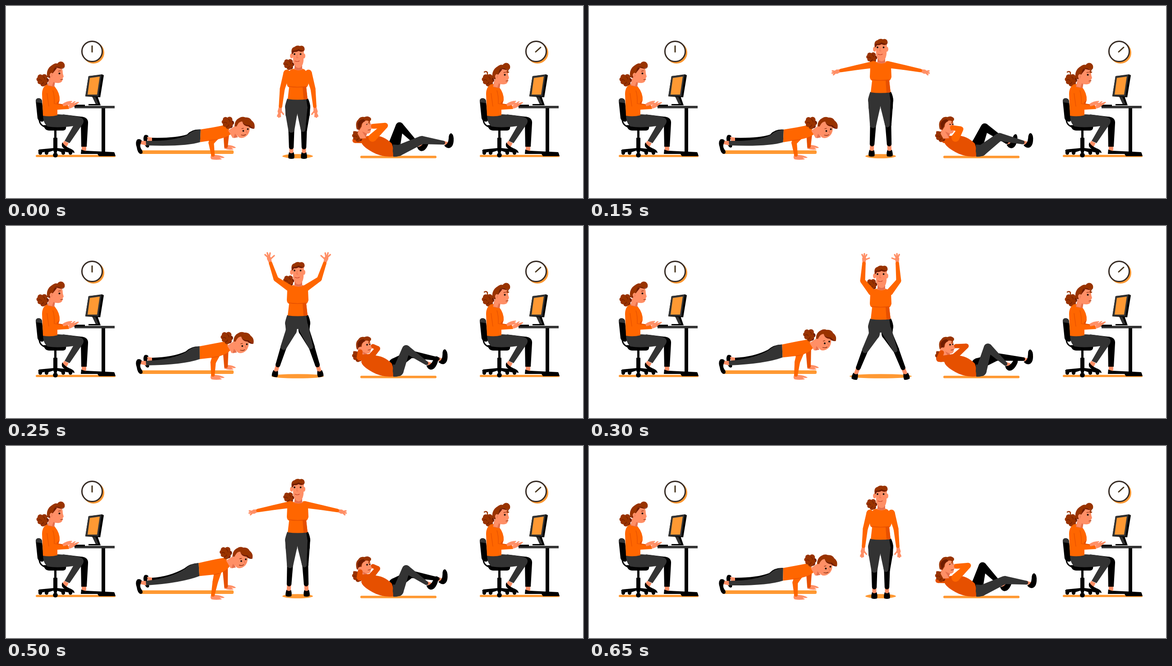
Write an HTML page that moves like this. It is 1280 px wide and 427 px high and loops after 700 ms.

```html
<!DOCTYPE html>
<html lang="en">
<head>
<meta charset="utf-8">
<title>Office workout</title>
<style>
html, body { margin: 0; width: 100%; height: 100%; overflow: hidden; background: #fff; }
svg { display: block; width: 100%; height: 100%; }
</style>
</head>
<body>
<svg id="stage" viewBox="0 0 1280 427"></svg>
<script>
const SHIRT = '#ff6600', SHADE = '#e65000', SKIN = '#ff8f66', BLUSH = '#e6704d';
const HAIR = '#993300', DARK = '#701c00', GREY = '#333', BLACK = '#000', AMBER = '#ff9933', EYE = '#201510';
const STEP = 50, STEPS = 14;

const path = (c, d) => `<path fill="${c}" d="${d}"/>`;
const line = (c, w, d) => `<path fill="none" stroke="${c}" stroke-width="${w}" stroke-linecap="round" stroke-linejoin="round" d="${d}"/>`;
const dot = (c, x, y, r) => `<circle fill="${c}" cx="${x}" cy="${y}" r="${r}"/>`;
const oval = (c, x, y, rx, ry) => `<ellipse fill="${c}" cx="${x}" cy="${y}" rx="${rx}" ry="${ry}"/>`;
const box = (c, x, y, w, h, r = 0) => `<rect fill="${c}" x="${x}" y="${y}" width="${w}" height="${h}" rx="${r}"/>`;
const group = (transform, s) => `<g transform="${transform}">${s}</g>`;
const mix = (a, b, u) => a.map((v, i) => v + (b[i] - v) * u);

// Tapered limb through joints [x, y, radius]
function limb(c, ...joints) {
  return joints.map(([x, y, r], i) => {
    let s = dot(c, x, y, r);
    if (joints[i + 1]) {
      const [X, Y, R] = joints[i + 1], len = Math.hypot(X - x, Y - y) || 1;
      const nx = (y - Y) / len, ny = (X - x) / len;
      s += path(c, `M${x + nx * r} ${y + ny * r}L${X + nx * R} ${Y + ny * R}L${X - nx * R} ${Y - ny * R}L${x - nx * r} ${y - ny * r}Z`);
    }
    return s;
  }).join('');
}

// Curly bun, about 27 px wide, centred on x, y
const bun = (x, y, k = 1) => group(`translate(${x} ${y}) scale(${k})`,
  dot(DARK, 9, 0, 5) + dot(DARK, 6, 7, 5) +
  [[-5, -7, 6], [4, -7, 6.5], [-9, -2, 4.5], [-6, 4, 5], [1, 8, 6], [6, 3, 5.5], [0, 0, 8]]
    .map(([a, b, r]) => dot(HAIR, a, b, r)).join('') +
  line(DARK, 1.2, 'M-9 0Q-5 -3 -2 1M1 -8Q5 -6 5 -2M-3 9Q1 8 2 4'));

function deskHead(messy) {
  const curls = messy ? line(HAIR, 2.4, 'M118 132Q129 135 125 141Q121 146 127 144M82 153Q79 150 80 145Q77 141 73 144') : '';
  return path(BLUSH, 'M96 160L109 168L107 180L92 177Z') +
    path(SKIN, 'M97 157L97 143L108 134L122 134Q126 141 126 150L128 157L126 160Q126 170 118 171Q111 172 105 169L102 178L93 176Z') +
    path(DARK, 'M91 158Q91 141 104 134L113 138L105 148L97 160Z') +
    path(HAIR, 'M91 156Q89 139 103 131Q109 126 114 128Q118 122 125 124Q132 128 130 136Q124 140 117 136Q109 134 106 141Q106 149 98 151L95 160Z') +
    path(DARK, 'M108 136Q115 133 122 138Q127 139 130 135Q128 141 120 139Z') +
    oval(SKIN, 101, 154, 4, 5.5) + line(BLUSH, 1, 'M101 151Q104 153 101 157') +
    dot(EYE, 118.5, 150, 2.1) + line(DARK, 1, 'M116 145L121 144M121 164L126 163') + curls;
}

function desk(x, messy) {
  const s = box(AMBER, 66, 331, 177, 5, 2.5) +
    // clock
    dot(AMBER, 194, 104, 24) + `<circle cx="191" cy="101" r="22.6" fill="#fff" stroke="#362b24" stroke-width="3"/>` +
    line('#46351d', 3, messy ? 'M190 102L201 92' : 'M191 89V102') +
    // chair
    path(BLACK, 'M66 211Q66 205 73 205Q80 206 80 213L84 253Q84 258 78 257Q72 256 70 250Z') +
    path(GREY, 'M66 214Q65 205 73 205Q80 206 80 216Z') +
    line(BLACK, 3, 'M74 254Q75 266 90 270') +
    path(BLACK, 'M83 265H133Q135 276 127 277H95Q86 277 83 265Z') +
    box(BLACK, 107, 276, 5, 20) + box(BLACK, 105, 293, 9, 25, 1) +
    path(BLACK, 'M105 316L74 319Q70 321 72 324L105 321L107 328H112L114 321L144 324Q148 321 144 319L114 316Z') +
    [76, 90, 127, 143].map(a => dot(BLACK, a, 326.5, 4.2) + line(BLACK, 2.5, `M${a} 325L109 319`)).join('') + dot(BLACK, 109.5, 331.5, 5.3) +
    // table and screen
    box(BLACK, 212, 225, 8, 101) + path(BLACK, 'M178 322L240 325Q242 329 243 334H206L203 329H178Z') +
    box(GREY, 152, 222, 89, 5.5) + box(BLACK, 146, 219.5, 29, 4) +
    path(BLACK, 'M191 201H203L210 221H183V218H199Z') + path(GREY, 'M191 201H198L205 218H199Z') +
    path(BLACK, 'M183 156L213 152L217 154L209 203L176 201Z') + path(GREY, 'M183 156L212 153L205 201L176 200Z') +
    path(AMBER, 'M186 160L208 157L202 197L181 197Z') +
    // far leg
    path(BLACK, 'M125 241L166 246Q183 247 182 261L179 313H167L166 260Z') +
    box(SKIN, 168, 313, 10, 9) + path(BLACK, 'M167 319Q174 323 186 323V329H166Z') +
    // near leg
    path(SKIN, 'M129 300L139 305L134 314L125 307Z') +
    path(BLACK, 'M125 303Q129 311 140 316Q152 320 152 327Q141 324 130 318Q121 313 125 303Z') +
    path(GREY, 'M82 242Q116 238 159 246Q176 249 171 261L141 305L130 300L149 267Q114 272 92 268Q82 260 82 242Z') +
    // body
    bun(messy ? 84 : 81, 165) +
    path(SHIRT, 'M91 174Q80 180 80 196L82 244Q98 247 114 243V226L119 209Q120 194 108 179Q99 172 91 174Z') +
    path(SHADE, 'M119 209L116 217L137 220V225L112 225L113 214Z') +
    group(messy ? 'translate(3 3)' : '', deskHead(messy)) +
    path(SHIRT, 'M90 190L104 189L107 217L138 222L140 229L108 231Q96 232 95 223Z') +
    line(SHADE, 1.2, 'M104 188Q108 201 107 217L137 222M91 194L95 223');
  return group(`translate(${x} 0)`, s);
}

function typing(x, i) {
  const near = [0, 2, -2, 1, 3, -1, 0][i % 7], far = -near;
  return group(`translate(${x} 0)`,
    group(`rotate(${far} 126 221)`, path(SKIN, 'M125 218Q134 211 146 211Q149 213 143 214L147 216L144 219L127 223Z')) +
    group(`rotate(${near} 138 226)`, path(SKIN, 'M138 222L145 217L151 212L155 212L150 217L160 213Q164 214 159 217L151 223Q147 227 140 228Z') +
      line(BLUSH, .8, 'M149 219L158 215')));
}

function pushup(low) {
  const xy = (a, b, c, d) => mix([a, b], [c, d], low);
  const hip = xy(427, 259, 433, 278), seat = xy(429, 288, 431, 306);
  const shoe = 'M291 297Q297 294 301 299L298 309Q297 315 302 321Q305 328 299 329Q292 328 290 314Q286 303 291 297Z';
  const head = bun(487, 236) +
    path(SKIN, 'M488 253L503 243L509 264L498 270Z') + path(BLUSH, 'M503 260L510 268L500 270Z') +
    path(SKIN, 'M503 243Q506 227 522 229L535 240Q538 254 531 263Q522 272 513 269Q503 263 503 243Z') +
    path(HAIR, 'M502 244Q502 230 513 225Q519 221 526 224Q536 223 540 231Q549 237 546 249Q538 249 534 242Q523 242 519 233Q511 233 507 244Z') +
    path(DARK, 'M519 233Q523 242 535 241Q540 247 546 249Q538 250 533 244Q522 244 519 233Z') +
    oval(SKIN, 511, 245, 4, 5.5) + dot(EYE, 521.5, 254, 2) + dot(EYE, 531.5, 250, 2) +
    line(BLUSH, 1.3, 'M528 253L530 259') + line(DARK, 1.1, 'M517 263Q523 265 527 262M518 249L522 248');
  return box(AMBER, 296, 321, 209, 8, 3) +
    group('translate(57 32) scale(.86)', path(BLACK, shoe)) +
    path(SKIN, 'M313 291L326 293V300H315Z') + path(SKIN, 'M299 300L312 300L311 310L298 307Z') + path(BLACK, shoe) +
    path(BLACK, `M324 293Q${xy(362, 290, 378, 295)} ${xy(395, 271, 403, 289)}Q${xy(408, 260, 413, 276)} ${hip}L${xy(398, 285, 400, 300)}L324 301Z`) +
    path(GREY, `M310 300Q${xy(365, 293, 374, 303)} ${xy(397, 272, 404, 290)}Q${xy(409, 260, 416, 279)} ${hip}L${seat}Q${xy(388, 304, 400, 315)} 311 310Z`) +
    path(SKIN, 'M484 310L492 309Q505 310 510 315Q508 317 500 315L505 319Q493 321 484 317Z') +
    limb(SHADE, [...xy(486, 270, 489, 293), 6], [488, 312, 4]) +
    path(SKIN, 'M455 331L464 331Q478 332 485 337Q482 339 474 337L479 341Q466 343 456 341Q452 338 455 331Z') +
    path(SHIRT, `M${hip}Q${xy(460, 251, 462, 274)} ${xy(487, 247, 489, 268)}L${xy(496, 266, 501, 288)}Q${xy(485, 281, 489, 297)} ${xy(462, 285, 455, 302)}L${seat}Z`) +
    limb(SHIRT, [...xy(471, 277, 463, 294), 8], [...xy(465, 302, 453, 304), 6], [459, 331, 4]) +
    line(SHADE, 1.2, `M${xy(462, 285, 448, 302)}L${xy(474, 282, 468, 300)}`) +
    group(`translate(${6 * low} ${29 * low})`, head);
}

// lift, shoulder, elbow, wrist, fingertip, foot offset, foot y, shadow radius, finger spread, thumb angle
const JACK = [
  [0, 623, 149, 613, 184, 609, 223, 605, 249, 14, 332, 34, .1, -.5],
  [-13, 633, 135, 597, 154, 562, 173, 544, 192, 14, 332, 34, .1, -.5],
  [-17, 631, 125, 594, 119, 556, 114, 532, 107, 26, 322, 34, .25, .5],
  [-8, 630, 139, 599, 118, 587, 83, 579, 58, 50, 328, 58, .2, .75],
  [0, 627, 147, 607, 122, 610, 83, 611, 60, 57, 334, 69, .2, .75]
];

function hand(x, y, tx, ty, spread, thumb) {
  const a = Math.atan2(ty - y, tx - x), len = Math.hypot(tx - x, ty - y);
  const at = (t, k) => [x + Math.cos(t) * len * k, y + Math.sin(t) * len * k];
  const mid = at(a, .45);
  return limb(SKIN, [x, y, 3.2], [...mid, 4.6]) +
    [-1, 0, 1].map(k => line(SKIN, 3.4, `M${mid}L${at(a + k * spread * 1.3, .93 - .06 * Math.abs(k))}`)).join('') +
    line(SKIN, 3.2, `M${at(a, .3)}L${at(a + thumb, .72)}`);
}

function jack(pose) {
  const [lift, sx, sy, ex, ey, wx, wy, tx, ty, foot, fy, shadow, spread, thumb] =
    mix(JACK[Math.floor(pose)], JACK[Math.ceil(pose)], pose % 1);
  const hip = [633, 224 + lift], sole = [647 - foot, fy], open = Math.max(0, foot - 14) / 43;
  const knee = mix(sole, hip, .53), ankle = mix(sole, hip, .17);
  const flip = s => group('translate(1294 0) scale(-1 1)', s);
  const lower = limb(SKIN, [...ankle, 4.5], [...mix(sole, hip, .04), 4.5]) +
    group(`translate(${sole}) rotate(${open * 12})`, path(BLACK, 'M-5 -7Q0 -2 5 -7Q8 2 6 7Q0 9 -6 7Q-8 3 -5 -7Z')) +
    limb(BLACK, [...knee, 6.6], [...ankle, 5.2]);
  const thigh = c => limb(c, [...hip, 13.8], [hip[0], hip[1] + 16, 13 - open], [...knee, 7]);
  const arms = hand(wx, wy, tx, ty, spread, thumb) +
    limb(SHIRT, [sx, sy, 7.5], [ex, ey, 5.5], [wx, wy, 3.8]);
  const rightKnee = [1294 - knee[0] - 2, knee[1]];
  const head = path(BLUSH, 'M640 126H657V140Q649 145 640 140Z') +
    path(SKIN, 'M636 97Q649 92 661 98L660 122Q658 137 649 138Q641 137 637 125Z') +
    oval(SKIN, 633.5, 111, 3.5, 5.5) + oval(SKIN, 661, 111, 3, 5.5) +
    path(HAIR, 'M634 107Q631 93 640 91Q645 86 652 89Q658 87 661 91Q664 96 661 100Q656 102 649 98Q643 101 639 100L636 107Z') +
    path(DARK, 'M635 99Q643 100 649 96Q655 100 661 99Q657 104 649 100Q644 103 639 102L635 107Z') +
    dot(EYE, 640, 107, 2) + dot(EYE, 653.5, 107, 2) +
    line(BLUSH, 1.1, 'M646 108L645 115H648') + line('#c23c22', 1.1, 'M641 122Q646 125 651 122');
  return oval(AMBER, 647, 334, shadow, 4.8) + lower + flip(lower) +
    flip(thigh(BLACK)) + thigh(GREY) + limb(GREY, [656, hip[1], 13], [...rightKnee, 5.2]) +
    group(`translate(0 ${lift})`,
      path(BLACK, 'M664 206H670Q675 216 674.8 225L662 226Z') +
      path(GREY, 'M624 206H666L669 226L661 234Q647 240 632 235L619.2 224Q620 216 624 206Z') + bun(627, 130, .88)) +
    arms + flip(arms) +
    group(`translate(0 ${lift})`,
      path(SHIRT, 'M632 141Q640 138 647 140Q656 138 662 141L670 150L671 173Q669 180 666 181L669 207Q647 210 625 207L628 181Q623 179 623 172L624 150Z') +
      path(SHADE, 'M658 180H666L669 207L660 208Z') + line(SHADE, 1.3, 'M628 179Q647 182 666 179') +
      path(SKIN, 'M637 140Q649 136 660 140Q649 146 637 140Z') + head);
}

// near knee, near ankle, near shoe turn, far knee, far ankle, far shoe turn, near elbow, near hand, far elbow
const SITUP = [
  [884, 269, 925, 307, 32, 906, 293, 968, 296, -2, 774, 297, 784, 276, 841, 265],
  [893, 281, 954, 302, 2, 885, 273, 950, 295, -4, 799, 286, 790, 271, 800, 284],
  [922, 298, 974, 304, 0, 873, 267, 916, 308, 22, 841, 266, 804, 268, 774, 299]
];

function situp(u) {
  const [kx, ky, ax, ay, turn, fkx, fky, fax, fay, farTurn, ex, ey, hx, hy, fx, fyy] =
    mix(SITUP[1], SITUP[u < 0 ? 0 : 2], Math.abs(u));
  const shoe = (x, y, r) => group(`translate(${x} ${y}) rotate(${r})`,
    path(BLACK, 'M-2 6Q7 4 8 -9Q8 -21 14 -21Q20 -17 19 -4Q18 10 9 12Q2 12 -2 6Z'));
  const ankle = (x, y) => limb(SKIN, [x - 2, y, 3.8], [x + 4, y + 2, 3.8]);
  const farHand = u < 0 ? limb(SKIN, [812, 268, 4], [804, 272, 4]) : '';
  const face = path(SKIN, 'M784 266Q786 252 799 251L808 257L809 266L812 272L809 275Q810 284 801 284L794 282L799 294L786 295L780 284Z') +
    path(BLUSH, 'M790 279L801 284L798 292Z') +
    path(HAIR, 'M778 274Q774 259 781 253Q786 245 795 247Q803 243 809 249Q812 254 806 257Q800 253 796 256Q789 260 789 268L784 276Z') +
    path(DARK, 'M780 262Q783 252 794 252L797 256Q788 259 787 268L782 275Z') +
    line(HAIR, 2.2, 'M800 251Q808 254 805 260M776 288Q769 284 772 279') +
    dot(EYE, 801, 264, 1.9) + dot(EYE, 807, 263, 1.6) + line(DARK, 1, 'M803 276L809 275');
  return box(AMBER, 786, 333, 169, 5.5, 2.5) +
    ankle(fax, fay) + shoe(fax, fay, farTurn) +
    limb(BLACK, [862, 307, 13], [fkx, fky, 8.5], [fax - 3, fay, 4]) +
    farHand + limb(SHADE, [805, 296, 7], [fx, fyy, 5.5], u < 0 ? [814, 267, 4.5] : [788, 300, 5]) +
    bun(780, 290, .9) +
    path(SHADE, 'M788 302Q797 286 816 288Q838 288 856 306L864 334Q836 338 813 325Q795 315 790 307Z') +
    face +
    ankle(ax, ay) + shoe(ax, ay, turn) +
    limb(GREY, [870, 322, 12], [kx, ky, 9], [ax - 4, ay, 4.3]) +
    path(GREY, 'M858 308L872 309L878 331Q870 336 859 335Z') +
    limb(SKIN, [hx, hy, 5.5], [(hx + ex) / 2, (hy + ey) / 2, 5]) +
    limb(u > -.3 ? SHIRT : SHADE, [813, 293, 9], [ex, ey, 6.3], [ex + (hx - ex) * .7, ey + (hy - ey) * .7, 5.4]);
}

// Push-up depth keys [ms, depth]
const DEPTH = [[0, .82], [100, 1], [200, .66], [300, .24], [400, 0], [450, 0], [550, .13], [650, .64], [700, .82]];
function depthAt(t) {
  const k = DEPTH.findIndex(([end]) => end > t), [a, va] = DEPTH[k - 1], [b, vb] = DEPTH[k];
  return va + (vb - va) * (t - a) / (b - a);
}

// Both run out and back: the jump turns at 325 ms, the twist at 375 ms
const JUMP = [4, 3, 2, 1.5, 1, .5, 0];
const TWIST = [-1, -.9, -.6, 0, .6, 1, 1, 1];
const swing = (keys, i, turn) => keys[Math.abs(i - turn) - .5];

const stage = document.getElementById('stage');
stage.innerHTML = `<g>${desk(0, false)}${desk(985, true)}</g><g></g>`;
const moving = stage.lastElementChild;

function draw(i) {
  moving.innerHTML = typing(0, i) + typing(985, i + 3) + pushup(depthAt(i * STEP)) +
    jack(swing(JUMP, i, 6.5)) + situp(swing(TWIST, i, 7.5));
}

let shown = -1;
function tick() {
  const i = Math.floor(performance.now() / STEP) % STEPS;
  if (i !== shown) draw(shown = i);
  requestAnimationFrame(tick);
}
tick();
</script>
</body>
</html>
```
